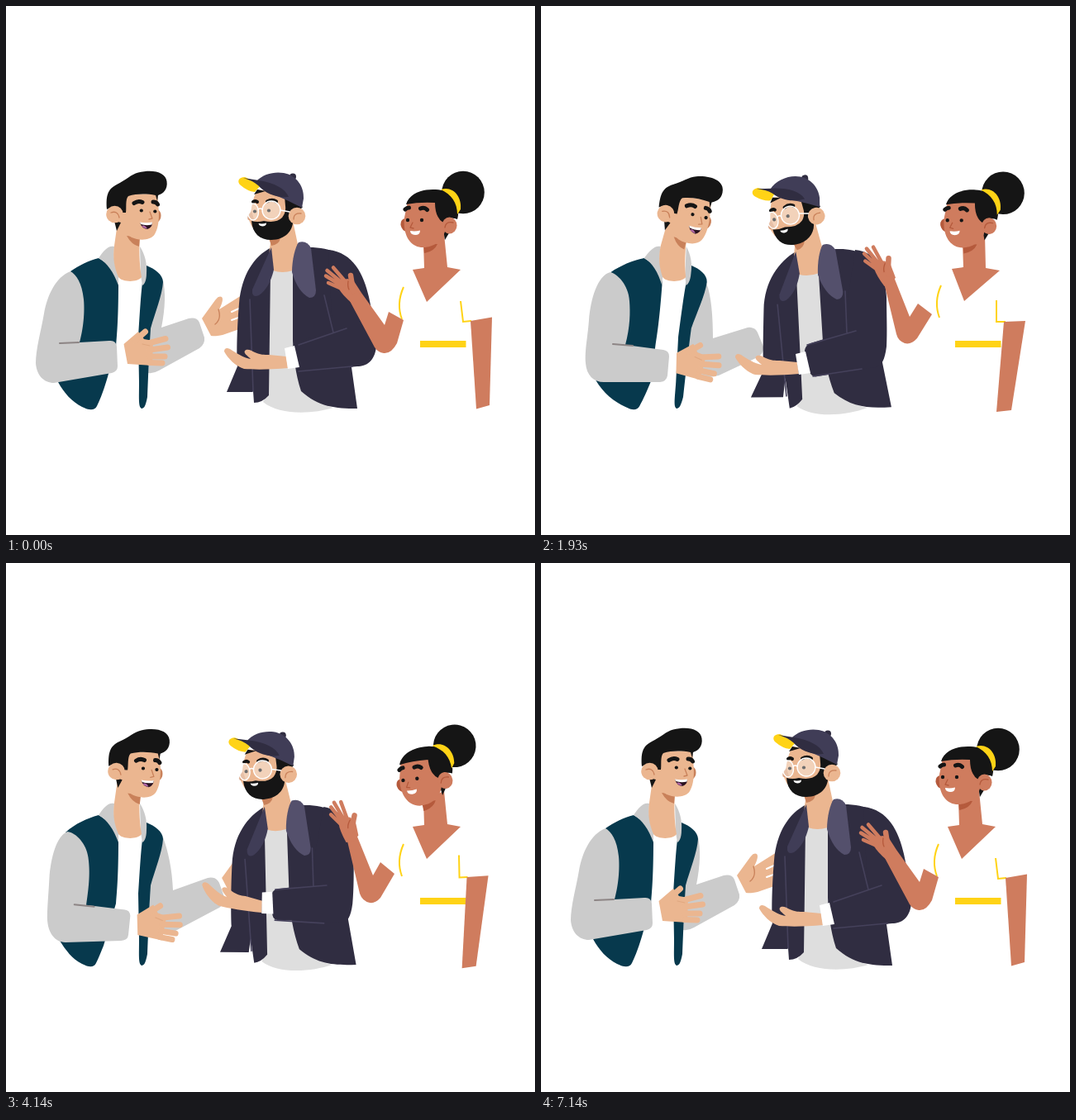
Recreate the animation shown at these times as an HTML page. Size 640 px wide and 640 px high, loop 7.21 s.

```html
<!DOCTYPE html>
<html lang="en">
<head>
<meta charset="utf-8">
<title>Three friends talking</title>
<style>
  html, body { margin: 0; width: 100%; height: 100%; overflow: hidden; background: #fff; }
  svg { display: block; width: 100%; height: 100%; }
  .skin { fill: #ebb690; } .shade { fill: #c9815a; }
  .tan { fill: #cf7c5e; } .tanShade { fill: #b55a3c; }
  .hair { fill: #151515; } .grey { fill: #cbcbcb; } .teal { fill: #07394d; }
  .coat { fill: #302d41; } .cap { fill: #403d57; } .lapel { fill: #54506c; }
  .white { fill: #fff; } .yellow { fill: #ffd316; }
  .line { fill: none; stroke-linecap: round; stroke-linejoin: round; }
  .brow { stroke: #151515; stroke-width: 5; }
  .brow.thin { stroke-width: 4; }
  .crease { stroke: #c9815a; stroke-width: 1.3; }
  .tanCrease { stroke: #b55a3c; stroke-width: 1.3; }
  .seam { stroke: #45415b; stroke-width: 1.6; }
  .trim { stroke: #ffd316; stroke-width: 2; stroke-linecap: butt; stroke-linejoin: miter; }
  .glass { fill: #fff; fill-opacity: .38; stroke: #fff; stroke-width: 1.4; }
</style>
</head>
<body>
<svg viewBox="0 0 640 640">
  <!-- left man -->
  <g id="farHand">
    <path class="skin" d="M237 378L253 356Q257 350 261 352Q264 355 258 367L285 350V390L262 398Q254 400 248 399Z"/>
    <path class="line" stroke="#fff" stroke-width="2" d="M273 370L284 365M273 380L284 376"/>
    <path class="line crease" d="M257 367Q261 379 253 385"/>
  </g>
  <path id="farSleeve" class="grey"/>
  <g id="leftBody">
    <path class="white" d="M135 325H165L161 440H133Z"/>
    <path id="vest" class="teal"/>
    <path class="teal" d="M170 314C180 318 190 325 190 334C189 350 180 372 175 390C173 420 172 450 171 473C169 484 167 487 164 487C160 485 161 475 161 455L160 400C162 370 163 350 165 335Z"/>
    <path class="grey" d="M112 305C118 296 124 289 131 291C130 303 131 315 136 325L136 338C130 322 122 310 112 305ZM162 291C168 300 171 312 170 323C170 333 167 337 165 338L163 326Z"/>
    <path id="leftNeck" class="skin"/>
  </g>
  <g id="leftHead">
    <path class="shade" d="M146 278L162 280L161 291Q152 289 146 278ZM183 246Q189 249 187 257Q185 262 180 263Z"/>
    <path class="hair" d="M131 260L139 262L134 272Z"/>
    <path class="skin" d="M145 228L183 227C184 240 188 262 180 276C175 284 161 284 152 280C143 275 137 262 136 245Z"/>
    <path class="hair" d="M122 246C121 231 122 222 134 216C146 210 151 204 160 201.500C178 197 193 201 194.500 212C196 222 190 227 184 229L183 236L181 229C170 227 158 227 148 230C144 234 146 245 145 250L138 250Q130 241 122 246Z"/>
    <circle class="skin" cx="131.500" cy="252" r="10.300"/>
    <path class="line crease" d="M127 250Q135 247 137 256M174 249L177 257L173 258"/>
    <path class="line brow" d="M155 238.500Q160 235 165 237.500M178 237Q182 237 183.500 240"/>
    <circle class="hair" cx="163.800" cy="247.500" r="2.100"/><circle class="hair" cx="180.300" cy="248.500" r="2.100"/>
    <path fill="#2a1220" d="M162 262Q170 264 177 262Q177 268 171 270Q164 269 162 262Z"/>
    <path fill="#b067a5" d="M164 266Q168 264 171 269.500Q166 269 164 266Z"/>
    <path class="white" d="M162 261.500Q170 263 177 261.500L176.500 264.500Q169 266 163 264Z"/>
  </g>
  <path id="nearSleeve" class="grey"/>
  <path id="sleeveCrease" class="line" stroke="#8d8585" stroke-width="2"/>
  <g id="nearHand" class="skin">
    <path d="M142.500 409L160 394L167 403L178 405L177 435L147 433Z"/>
    <path class="line" stroke="#ebb690" stroke-width="7" d="M156 405L168.500 394M172 408L193 402.500M174 416L195.500 413M174 424L192 424M174 431.500L189 432"/>
    <path class="line" stroke="#e0a880" stroke-width="1" d="M174 411L165 409"/>
  </g>

  <!-- middle man -->
  <g id="midBody">
    <path fill="#dedede" d="M319 316H348L349 410C352 450 358 476 396 486C370 494 330 495 311 479L317 465Z"/>
    <path id="coatLeft" class="coat"/>
    <path class="coat" d="M347 318L366 292C395 292 412 300 418 330L417 430L425 487C398 487 378 485 357 466C350 444 348 425 347 405Z"/>
    <path class="line seam" d="M295 355L299 466"/>
    <path class="skin" d="M320 287L326 268L347 260L354 293C352 303 349 312 347 320Q334 324 323 320C317 310 318 298 320 287Z"/>
    <path class="cap" d="M321 292L298 343Q297 354 306 350Q319 341 324 319Z"/>
    <path class="lapel" d="M346 322C346 307 350 291 354 286Q364 283 369 293L375 344Q375 353 367 353Q353 346 346 322Z"/>
  </g>
  <g id="midHead">
    <path class="shade" d="M318 281L332 281Q330 289 321 290Z"/>
    <path class="skin" d="M304 222C298 234 297 245 296 250Q291 255 294 259L298 268L342 264L345 232L320 224Z"/>
    <path class="shade" opacity=".55" d="M297 248Q290 255 293 259L300 258Z"/>
    <path class="hair" d="M337 230L359 243L347 256C349 270 339 283 321 283C307 283 298 275 297 260Q304 262 312 260Q327 263 334 256Q339 250 338 242ZM300 228L304 222L314 224Z"/>
    <circle class="skin" cx="352" cy="254" r="10.300"/>
    <path class="line crease" d="M348 258Q348 250 357 251"/>
    <path class="line brow thin" d="M299 237Q302 235 304 237M316 236.500Q322 233 327 236.500"/>
    <circle class="hair" cx="301" cy="248.500" r="2.100"/><circle class="hair" cx="318" cy="247.500" r="2.100"/>
    <ellipse class="glass" cx="299" cy="249" rx="6.500" ry="10"/>
    <circle class="glass" cx="321" cy="247" r="11"/>
    <path class="line" stroke="#fff" stroke-width="1.500" d="M305 246Q308 244 310 246M332 247L343 249"/>
    <path class="white" d="M305.500 263Q310 264 315 262.500Q315 266.500 310 266.500Q306 266 305.500 263Z"/>
    <circle class="coat" cx="347" cy="206.500" r="4"/>
    <path class="cap" d="M303 212C311 203 325 200 336 202C352 205 361 219 360 233L358 244C346 238 337 233 325 229Z"/>
    <path class="yellow" d="M289 207C281 207 279 213 284 217Q292 224 301 225L309 216Z"/>
    <path class="coat" d="M287 208L306 211C325 214 338 221 342 231C326 232 314 227 305 217Q298 211 287 208Z"/>
  </g>
  <path id="midArm" class="coat"/>
  <path id="midSeams" class="line seam"/>
  <g id="midHand">
    <path class="skin" d="M264 418C264 413 269 413 274 417C282 422 289 426 296 427C292 423 287 420 289 417C292 414 297 417 301 419C308 422 312 422 318 422L339 424L341 438C320 440 300 440 288 439C278 436 268 426 264 418Z"/>
    <path class="white" d="M337 414L349 411L355 437L341 439Z"/>
  </g>

  <!-- woman -->
  <path id="chest" class="tan"/>
  <g id="herHead">
    <circle class="hair" cx="553" cy="225.500" r="25.800"/>
    <path class="tanShade" d="M505 287L522 288Q518 297 506 299ZM483 257Q477 258 477.500 265Q479 272 485 273Z"/>
    <path class="hair" d="M529 271L537 273L531 283Z"/>
    <path class="tan" d="M486 236L524 230C524 250 532 260 531 273C527 287 513 293 502 292C488 290 480 276 482 256Z"/>
    <path class="hair" d="M484 240C488 227 503 221 520 222C541 223 551 240 546 258Q537 254 529 262Q519 256 519 238Q500 237 484 240Z"/>
    <path class="yellow" d="M526 222C540 217 552 230 550 246L546 252C546 238 539 228 526 222Z"/>
    <ellipse class="tan" cx="536.500" cy="265.500" rx="9" ry="10"/>
    <path class="line tanCrease" d="M531 268Q532 260 541 262M492 262L489 268L493 269"/>
    <path class="line brow" d="M483 246Q485 244 487.500 244M501.500 245Q506 243 509.500 246.500"/>
    <circle class="hair" cx="486" cy="259" r="2.200"/><circle class="hair" cx="503" cy="259" r="2.200"/>
    <path class="white" d="M489 272Q495 273 501 271.500Q501 277 495 277Q489 276.500 489 272Z"/>
  </g>
  <path id="sideTrim" class="line trim" d="M481 340Q472 360 479 379"/>
  <path id="sleeveTrim" class="line trim"/>
  <rect class="yellow" x="501" y="405" width="55.500" height="8"/>
  <path id="herFarArm" class="tan"/>
  <path id="herArm" class="tan"/>
  <g id="herHand">
    <path class="tan" d="M402 333L413 330L421 333L430 347L427 356L419 360Q407 350 402 341Z"/>
    <path class="line" stroke="#cf7c5e" stroke-width="4.500" d="M411 334L396 316.500M408 336L388.500 320M407 339L387 326.500M406 342L390 335"/>
    <path class="line" stroke="#cf7c5e" stroke-width="6.500" d="M420 345L417 326"/>
    <path class="line tanCrease" d="M414 333Q413 339 415 343"/>
  </g>
</svg>
<script>
const LOOP = 7210, STEPS = 101;
const TIMES = [0, 860, 1930, 3500, 4710, 5710];
const REST = 7140;
const tracks = [];
const split = s => s.split(/(-?\d+(?:\.\d+)?)/);

// A number in place of a pose repeats the pose at that index.
function track(id, attr, poses, times = TIMES) {
  const full = poses.map(p => typeof p === 'number' ? poses[p] : p);
  const keys = full.map((p, i) => ({ t: times[i], parts: split(p) }));
  keys.push({ t: REST, parts: keys[0].parts });
  tracks.push({ el: document.getElementById(id), attr, keys });
}
const morph = (id, poses, times) => track(id, 'd', poses, times);

// Each pose is [dx, dy, angle] around a fixed pivot.
function move(id, pivot, poses, times) {
  track(id, 'transform', poses.map(([x, y, a]) =>
    `translate(${x} ${y}) rotate(${a} ${pivot})`), times);
}

const armTimes = [0, 860, 1640, 2100, 3500, 4710, 5500];

move('farHand', '240 390', [[0, 0, 0], [25, 3, 0], [40, 10, 0], [23, 3, 0], [25, 3, 0], [25, 3, 0]]);
morph('farSleeve', [
  'M170 325L190 332C193 345 193 365 188 389L221 378Q231 376 234 383L240 401Q241 409 234 414L185 441Q178 445 172 444L174 390Z',
  'M170 325L190 332C196 348 201 370 202 396L244 381Q254 379 258 387L264 404Q265 412 258 417L205 445Q185 452 173 440L174 390Z',
  'M180 325L200 335C206 350 208 375 208 402L250 389Q259 388 262 395L269 412Q270 420 262 425L215 447Q195 452 176 444L180 390Z',
  1, 1, 1]);
track('leftBody', 'transform', ['matrix(1 0 0 1 0 0)', 0, 'matrix(1 0 -0.07 1 34.1 0)', 0, 0, 0]);
morph('vest', [
  'M78 321C88 314 100 308 112 305C125 312 134 325 136 334C136 370 135 390 133 412L124 445C119 463 114 476 110 484C107 490 100 489 92 485C80 479 70 468 63 455L90 400Z',
  0,
  'M73 322C84 314 98 308 112 305C125 312 134 325 136 334C136 370 135 390 133 412L131 453C127 465 123 476 119 484C116 490 110 489 102 485C88 479 74 468 64 453L85 400Z',
  'M72 326C84 315 98 309 112 305C125 312 134 325 136 334C136 370 135 390 133 412L118 463C115 470 112 478 109 484C106 490 100 489 92 485C80 479 72 468 65 457L90 400Z',
  3, 0]);
morph('leftNeck', [
  'M136 255L131 290C129 305 131 316 136 328C140 334 159 335 164 328C161 310 161 295 162 275Z',
  'M141 257L131 293C129 305 131 316 136 328C140 334 159 335 164 328C161 310 161 295 163 281Z',
  'M138 257L131 290C129 305 131 316 136 328C140 334 159 335 164 328C161 310 161 295 162 278Z',
  0, 0, 0]);
move('leftHead', '150 270', [[0, 0, 0], [5.5, 2.5, 12], [16, 2, 10], [3.2, 1.2, 4], [0, 0, 0], [0, 0, 0]]);
morph('nearSleeve', [
  'M78 321C60 328 50 350 46 372C42 395 36 415 36 432C37 447 46 456 58 456L128 444Q135 442 135 436L134 412Q133 404 125 405L89 407C95 385 95 365 94 355C92 335 85 325 78 321Z',
  'M78 321C60 328 50 350 47 372C43 395 37 415 37 432C38 447 47 456 59 456L129 444Q136 442 136 436L135 412Q134 405 126 406L90 407C96 385 96 365 95 355C93 335 85 325 78 321Z',
  'M84 322C68 326 60 355 58 380C56 405 53 415 54 432C55 447 64 455 76 455L144 455Q152 454 153 447L155 424Q155 417 148 416L102 410C108 388 108 370 107 357C106 337 92 324 84 322Z',
  2,
  'M75 325C62 330 55 360 54 385C53 405 51 415 51 430C51 447 60 459 72 460L138 464Q147 464 148 457L152 435Q152 428 146 427L97 416C102 385 102 370 100 357C98 340 85 327 75 325Z',
  'M74 325C60 330 53 355 51 380C50 400 49 415 49 430C50 447 58 459 72 458L140 451Q148 450 148 444L149 420Q148 413 142 413L97 412C101 385 101 370 99 355C97 340 85 326 74 325Z',
  0], armTimes);
morph('sleeveCrease', ['M65 408L88 407', 'M66 408L89 407', 'M87 409L111 411', 2, 'M86 415L111 420', 'M80 412L103 412', 0], armTimes);
move('nearHand', '145 421', [[0, 0, 0], [1.5, 2, 1], [19, 11, 12], [19, 11, 12], [15, 26, 15], [13.5, 9, 4], [0, 0, 0]], armTimes);

move('midBody', '395 487', [[0, 0, 0], [0, 0, 0], [-1, 0, -3.5], [-2.5, 0, -4], [-0.5, 0, -0.3], [0, 0, 0]]);
morph('coatLeft', [
  'M321 292C300 303 285 325 282 360C279 395 279 425 280 436L267 467L298 467L299 466L300 480Q310 480 318 471L320 320Z',
  0,
  'M321 292C300 303 281 325 278 360C275 395 273 425 273 434L256 465L295 467L299 444L302 481Q310 480 318 471L320 320Z',
  'M321 292C300 303 279 325 276 360C273 395 272 425 271 434L254 465L293 468L298 433L304 481Q310 480 318 471L320 320Z',
  0, 0]);
move('midHead', '330 270', [[0, 0, 0], [0, 0, 0], [-15.3, 4, -11], [-19.3, 5, -5], [-1.5, 0.5, 0], [0, 0, 7]]);
morph('midArm', [
  'M390 295C420 298 433 325 439 352C443 372 449 395 448 412C446 430 436 436 425 436L362 442Q355 443 353 435L347 414Q346 409 354 406L395 392Z',
  'M390 295C415 300 425 320 427 352C427 372 426 395 424 412C422 428 418 433 410 433L332 428Q326 426 327 418L327 396Q329 390 337 390L370 388Z',
  'M380 295C408 298 416 320 418 352C418 372 419 395 418 412C416 428 412 436 405 437L335 448Q328 450 325 443L319 418Q319 411 326 408L365 396Z',
  'M380 295C406 300 414 320 415 350C416 372 417 395 416 412C414 428 410 437 403 437L326 437Q319 436 319 429L317 407Q318 400 326 399L365 392Z',
  'M388 295C413 300 423 320 425 352C425 372 424 395 422 412C420 428 416 433 408 433L330 428Q324 426 325 418L325 396Q327 390 335 390L368 388Z',
  1]);
morph('midSeams', [
  'M385 350L396 395M354 410L412 390M354 442L419 436',
  'M377 345L378 389M331 391L394 390M329 428L388 436',
  'M368 345L370 395M322 410L381 393M329 448L388 439',
  'M365 345L367 393M322 400L383 390M323 437L383 437',
  'M375 345L376 389M329 391L392 390M327 428L386 435',
  1]);
move('midHand', '340 428', [[0, 0, 0], [-25, -21, 13], [-29, 7, 0], [-33, -8, 7], [-27, -21, 13], [-26, -21, 13]]);

morph('chest', [
  'M492 319L506 317L505 286L530 276L534 316L550 319L509 358Z',
  'M499 317L514 316L514 285L540 276L541 316L557 321L513 357Z',
  'M497 318L511 316L510 286L537 276L538 317L555 320L512 357Z',
  0, 0, 0]);
move('herHead', '520 285',
  [[0, 0, 0], [9, 0, 3], [11, 0, 4], [5.5, 0.5, 0.5], [-2, 0, -1.5], [-3, -1, -12], [-2, 0, -3]],
  [0, 860, 1250, 1930, 3500, 4710, 5710]);
move('sideTrim', '480 360', [[0, 0, 0], [5, -3, 0], [3, -2, 0], [0, 0, 0], [0, 0, 0], [0, 0, 0]]);
morph('sleeveTrim', [
  'M550 357L553 382L563 381', 'M554 358L554 384L563 383', 'M551 356L551 382L562 382',
  'M548 353L548 380L558 380', 'M548 354L549 381L559 380', 'M549 355L551 381L561 380']);
morph('herFarArm', [
  'M562 381L588 376.5L585 483L569 487.5Z', 'M562 384L588 383L573 489L555 491Z',
  'M560 382L586 381L569 489L551 491Z', 'M557 380L583 378.5L567 488L550 490.5Z',
  'M558 380L584 378L570 487.5L553 490Z', 'M560 380L585 377.5L576 486L559 489.5Z']);
morph('herArm', [
  'M463 370L481 380L473 408Q466 421 457 420Q450 419 446 413L416 357L430 347L458 386Z',
  'M464 365L483 377L472 405Q465 416 456 415Q448 413 446 405L423 348L434 341L459 381Z',
  'M456 360L473 373L455 402Q448 410 440 408Q432 405 430 397L415 335L427 328L446 376Z',
  'M453 362L470 376L453 405Q447 412 440 411Q431 409 428 400L412 337L423 331L444 378Z',
  'M453 362L470 376L453 405Q447 412 440 411Q431 409 428 400L413 333L425 327L444 378Z',
  'M462 370L480 380L470 409Q465 420 457 420Q449 418 445 411L417 355L428 345L457 387Z']);
move('herHand', '423 352', [[0, 0, 0], [6, -8, 5], [-2, -20, 12], [-6, -18, 15], [-4, -22, 25], [0, -2, 8]]);

function valueAt(keys, t) {
  const next = keys.findIndex(k => k.t > t);
  if (next < 0) return keys[keys.length - 1].parts.join('');
  const a = keys[next - 1], b = keys[next];
  const p = (t - a.t) / (b.t - a.t);
  const ease = p * p * (3 - 2 * p);
  return a.parts.map((s, i) => i % 2 ? +s + (b.parts[i] - s) * ease : s).join('');
}

function draw(now) {
  const step = LOOP / STEPS;
  const t = Math.floor((now % LOOP) / step) * step;
  for (const { el, attr, keys } of tracks) el.setAttribute(attr, valueAt(keys, t));
  requestAnimationFrame(draw);
}
draw(performance.now());
</script>
</body>
</html>
```
